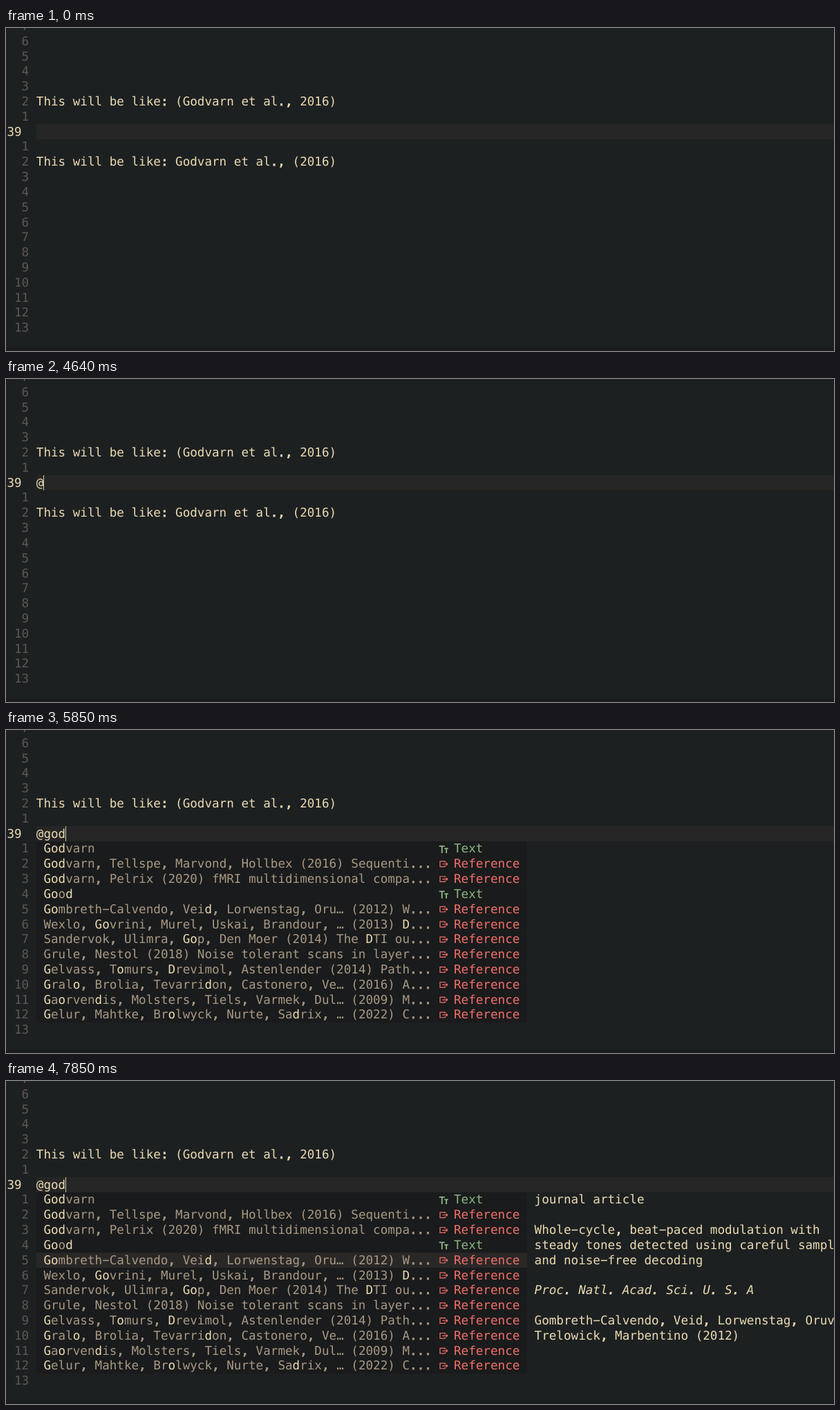
Write an HTML page that moves like this. It is 1198 px wide and 467 px high and loops after 8 s.

```html
<!DOCTYPE html>
<html lang="en">
<head>
<meta charset="utf-8">
<title>Citation completion</title>
<style>
  html, body { margin: 0; width: 100%; height: 100%; overflow: hidden; background: #1d2021; }
  svg { display: block; color: #ebdbb2; }
  text {
    font: 17.6px "DejaVu Sans Mono", monospace;
    text-rendering: geometricPrecision;
    white-space: pre;
    fill: currentColor;
  }
  .gutter { color: #5a5855; }
  .item { color: #a89984; }
  .match { fill: #ebdbb2; }
  .dot { stroke: currentColor; stroke-width: 0.8; }
  .Text { color: #89b482; }
  .Reference { color: #f2706a; }
  .icon { fill: none; stroke: currentColor; stroke-width: 1.2; }
  .icon.Text { stroke-width: 1.9; }
  .journal { font-style: italic; }
</style>
</head>
<body>
<svg id="stage" width="1198" height="467"></svg>
<script>
const LOOP = 8000, CELL = 10.6, LINE = 21.82;
const colX = c => 1.4 + c * CELL;
const rowY = r => 139.1 + r * LINE; // row 0 is the cursor line

const rect = (x, y, w, h, fill) =>
  `<rect x="${x}" y="${y}" width="${w}" height="${h}" fill="${fill}"/>`;

// Matched letters are wrapped in asterisks; punctuation is drawn heavier
const span = (cls, str) => `<tspan class="${cls}">${str}</tspan>`;
const format = str => str
  .replace(/[.,:]+/g, s => span('dot', s))
  .replace(/\*(.+?)\*/g, (_, s) => span('match', s));

const text = (col, row, str, cls = '') =>
  `<text x="${colX(col)}" y="${rowY(row) + 16.5}" class="${cls}">${format(str)}</text>`;

const iconPaths = {
  Text: 'M0 -4H8M4 -4V6M7.5 -0.5H13M10.3 -0.5V6',
  Reference: 'M8.5 -2V-3.8H1.2V3.8H8.5V2M4.5 0H12M10 -2L12 0L10 2'
};
const icon = (row, kind) =>
  `<path class="icon ${kind}" transform="translate(${colX(59)} ${rowY(row) + 11})" d="${iconPaths[kind]}"/>`;

const firstList = [
  '*go*v', '*go*lden', '*Go*dvarn', '*Go*od',
  '*Go*dvarn, Tellspe, Marvond, Hollbex (2016) Sequenti...',
  '*Go*rvel, Tamsher, Bulrey, Nusk (2007) Gaze Patterns',
  '*Go*sk, Urlen, Vetri (2015) Vigilance: The brainstem',
  '*Go*dvarn, Pelrix (2020) fMRI multidimensional compa...',
  '*Go*rune, Nelkaus, Parnothemi (2016) fMRI in Deep La...',
  '*Go*mbreth−Calvendo, Veid, Lorwenstag, Oru… (2012) W...',
  'Morlett, Tindrel, Sovik, Plenk (1981) *g*le fr*o*m a f...',
  'Velani, *Go*rbens, Wuja, Ostleton, Trusby (2000) The...',
  'Wexlo, *Go*vrini, Murel, Uskai, Brandour, … (2013) D...',
  'Orstin, Vul (2011) Rapid versus steady evaluation ...'
];
const secondList = [
  '*God*varn',
  '*God*varn, Tellspe, Marvond, Hollbex (2016) Sequenti...',
  '*God*varn, Pelrix (2020) fMRI multidimensional compa...',
  '*Go*o*d*',
  '*Go*mbreth−Calvendo, Vei*d*, Lorwenstag, Oru… (2012) W...',
  'Wexlo, *Go*vrini, Murel, Uskai, Brandour, … (2013) *D*...',
  'Sandervok, Ulimra, *Go*p, Den Moer (2014) The *D*TI ou...',
  'Grule, Nestol (2018) Noise tolerant scans in layer...',
  '*G*elvass, T*o*murs, *D*revimol, Astenlender (2014) Path...',
  '*G*ral*o*, Brolia, Tevarri*d*on, Castonero, Ve… (2016) A...',
  '*G*a*o*rven*d*is, Molsters, Tiels, Varmek, Dul… (2009) M...',
  '*G*elur, Mahtke, Br*o*lwyck, Nurte, Sa*d*rix, … (2022) C...'
];

// Details by selected row: title lines, journal, author lines
const details = {
  2: [['Sequential patterns in shape detection:', 'Progressive and recurrent signal transfer', 'pathways'],
      'Neuroimage', ['Godvarn, Tellspe, Marvond, Hollbex (2016)']],
  3: [['fMRI multidimensional comparison analysis', 'exposes stable differences for luminance', 'peripheral stimulus position across adult', 'visual fields'],
      'Neuroimage', ['Godvarn, Pelrix (2020)']],
  5: [['Whole−cycle, beat−paced modulation with', 'steady tones detected using careful sampling', 'and noise−free decoding'],
      'Proc. Natl. Acad. Sci. U. S. A', ['Gombreth−Calvendo, Veid, Lorwenstag, Oruvi,', 'Trelowick, Marbentino (2012)']]
};

const steps = [
  { at: 0, typed: '', cursor: 'none' },
  { at: 1180, typed: '', cursor: 'block' },
  { at: 3040, typed: '' },
  { at: 4640, typed: '@' },
  { at: 5450, typed: '@g' },
  { at: 5580, typed: '@go', list: firstList },
  { at: 5850, typed: '@god', list: secondList },
  { at: 7180, typed: '@god', list: secondList, pick: 2 },
  { at: 7310, typed: '@god', list: secondList, pick: 3 },
  { at: 7710, typed: '@god', list: secondList, pick: 4 },
  { at: 7850, typed: '@god', list: secondList, pick: 5 }
];

function editor() {
  let out = rect(0, 462, 1198, 5, '#191b1c') + rect(colX(4), 139, 1198, 22, '#252625');
  for (let r = -7; r <= 13; r++)
    out += r ? text(1, r, String(Math.abs(r)).padStart(2), 'gutter') : text(0, 0, '39');
  return out + text(4, -2, 'This will be like: (Godvarn et al., 2016)')
             + text(4, 2, 'This will be like: Godvarn et al., (2016)');
}

function cursorAt({ typed, cursor = 'bar' }) {
  if (cursor === 'none') return '';
  return rect(Math.floor(colX(4 + typed.length)), 139, cursor === 'block' ? 11 : 1, 22, '#d5c4a1');
}

function menu({ list, pick }) {
  const top = rowY(1), width = CELL * 67;
  let out = rect(colX(4), top, width, list.length * LINE + 0.7, '#1a1b1c');
  if (pick) out += rect(colX(4), rowY(pick), width, LINE, '#2a2827');
  list.forEach((item, i) => {
    const row = i + 1;
    const kind = item.includes('(') ? 'Reference' : 'Text';
    out += text(5, row, item, 'item') + icon(row, kind) + text(61, row, kind, kind);
  });
  if (list === firstList)
    out += rect(colX(71), top, CELL, 467 - top, '#3c3c3b') + rect(colX(71), top, CELL, LINE * 10, '#5a5a59');
  return out;
}

function detail([title, journal, authors]) {
  const lines = ['journal article', '', ...title, '', journal, '', ...authors];
  return lines.map((line, i) => text(72, i + 1, line, line === journal ? 'journal' : '')).join('');
}

const stage = document.getElementById('stage');
const base = editor();
const start = performance.now();
let shown;

function draw() {
  const time = (performance.now() - start) % LOOP;
  const step = steps.findLast(s => s.at <= time);
  if (step !== shown) {
    shown = step;
    stage.innerHTML = base + text(4, 0, step.typed) + cursorAt(step)
      + (step.list ? menu(step) : '')
      + (details[step.pick] ? detail(details[step.pick]) : '');
  }
  requestAnimationFrame(draw);
}
draw();
</script>
</body>
</html>
```
